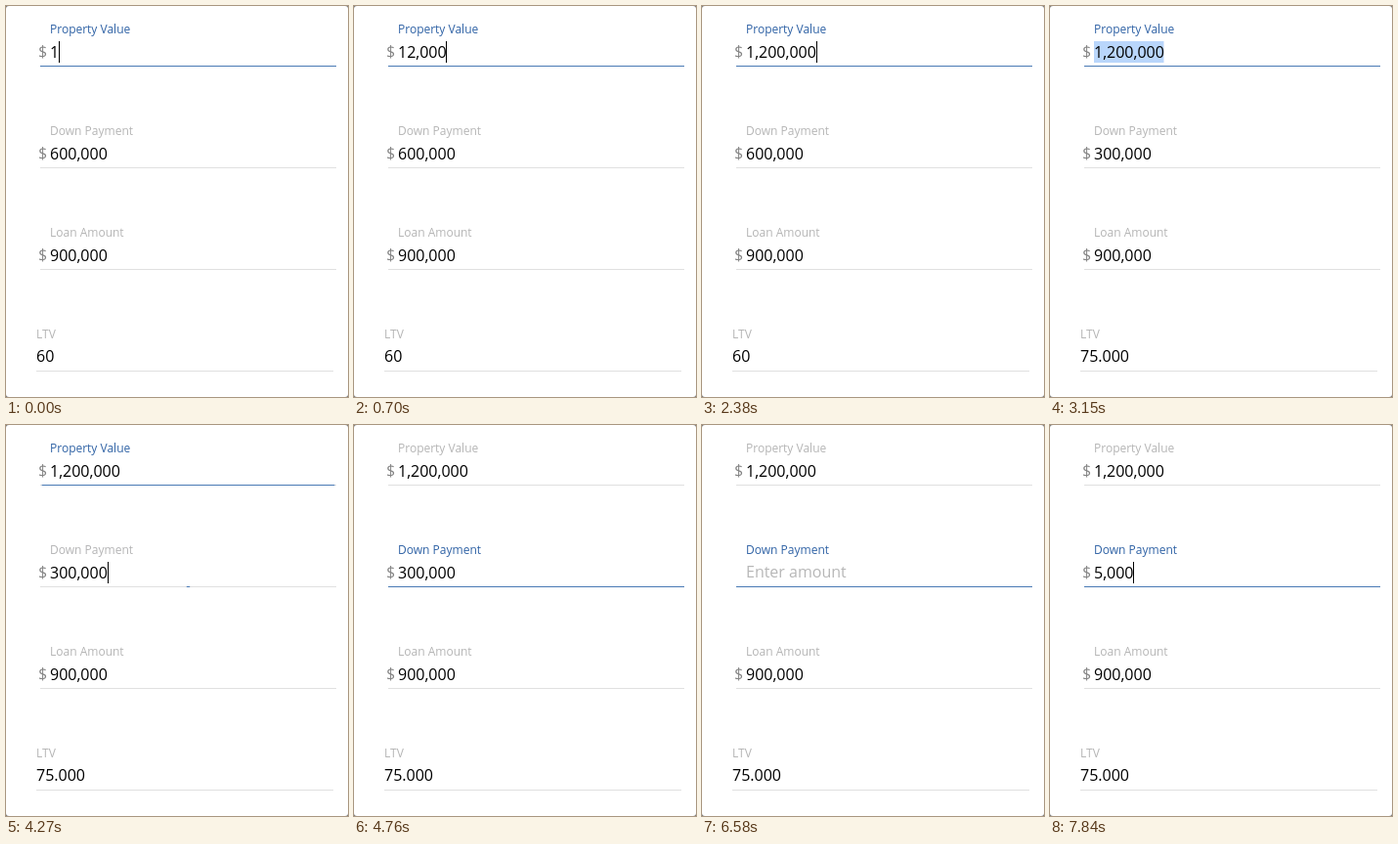
These frames come from a looping animation (350 by 400 pixels, 8000 ms). An HTML page:

```html
<!DOCTYPE html>
<html lang="en">
<head>
<meta charset="utf-8">
<title>Loan form</title>
<style>
  html, body { margin: 0; width: 100%; height: 100%; overflow: hidden; background: #777; }
  svg { display: block; width: 350px; height: 400px; background: #fff; border-radius: 3px; }
  text { font-family: "Open Sans", sans-serif; font-size: 16px; white-space: pre; }
  .label { font-size: 12px; fill: #b5b5b5; }
  .sign { fill: #858585; }
  .hint { fill: #b7b7b7; }
  .line { fill: #e0e0e0; }
  .focus { fill: #4a7ab5; }
</style>
</head>
<body>
<svg id="stage" viewBox="0 0 350 400"></svg>
<script>
const LOOP = 8000, FADE = 450, SWITCH = 4270, CLEARED = 6090, RETYPED = 7280;
const GRAY = [181, 181, 181], BLUE = [47, 98, 165];
const stage = document.getElementById('stage');

function add(tag, attrs, text = '') {
  const el = document.createElementNS('http://www.w3.org/2000/svg', tag);
  for (const key in attrs) el.setAttribute(key, attrs[key]);
  el.textContent = text;
  stage.append(el);
  return el;
}

const selection = add('rect', { x: 45, y: 36, width: 71.5, height: 22, fill: '#b9d6fb' });

function field(name, y, x = 45, left = 35, right = 338, drop = 53) {
  const label = add('text', { class: 'label', x, y: y + 28 }, name);
  add('rect', { class: 'line', x: left, y: y + 61, width: right - left, height: 1 });
  const focus = add('rect', { class: 'focus', y: y + 61, width: 0, height: 1 });
  const sign = x === 45 ? add('text', { class: 'sign', x: 33, y: y + 52 }, '$') : null;
  return { label, focus, sign, value: add('text', { x, y: y + drop }) };
}

const property = field('Property Value', 0);
const down = field('Down Payment', 104);
const loan = field('Loan Amount', 208);
const ltv = field('LTV', 312, 31, 31, 335, 52);
const hint = add('text', { class: 'hint', x: 45, y: 156 }, 'Enter amount');
const caret = add('rect', { width: 1, height: 22, fill: '#000' });

// Each step: start time, new content
const propertySteps = [[0, '1'], [70, '12'], [280, '120'], [490, '1,200'],
  [700, '12,000'], [910, '120,000'], [1330, '1,200,000']];
const downSteps = [[0, '600,000'], [2940, '300,000'], [4900, '30,000'], [5040, '3,000'],
  [5250, '300'], [5460, '30'], [5600, '3'], [CLEARED, ''],
  [RETYPED, '5'], [7490, '50'], [7630, '500'], [7840, '5,000']];
const ltvSteps = [[0, '60'], [2940, '75.000']];
const caretSteps = [[0, true], [1890, false], [2380, true], [2870, false], [SWITCH, true],
  [4760, false], [4900, true], [6580, false], [7140, true]];

const at = (steps, t) => steps.findLast(step => step[0] <= t)[1];

function eased(t, start) {
  const p = Math.min(1, Math.max(0, (t - start) / FADE));
  return 1 - (1 - p) ** 5;
}

function setText(el, text) {
  if (el.textContent !== text) el.textContent = text;
}

function setFocus(f, amount) {
  const mix = GRAY.map((g, i) => Math.round(g + (BLUE[i] - g) * amount));
  f.label.style.fill = `rgb(${mix})`;
  f.focus.setAttribute('x', 186.5 - 151.5 * amount);
  f.focus.setAttribute('width', 303 * amount);
}

function textWidth(s) {
  return [...s].reduce((w, c) => w + (c === ',' ? 3.92 : 9.15), 0);
}

function draw(t) {
  const first = at(propertySteps, t), second = at(downSteps, t);
  setText(property.value, first);
  setText(down.value, second);
  setText(loan.value, '900,000');
  setText(ltv.value, at(ltvSteps, t));

  const moved = eased(t, SWITCH);
  setFocus(property, 1 - moved);
  setFocus(down, moved);

  down.sign.style.opacity = second ? 1 : 0;
  hint.style.opacity = eased(t, CLEARED) - eased(t, RETYPED);
  selection.style.opacity = t >= 2940 && t < SWITCH ? 1 : 0;

  const inFirst = t < SWITCH;
  caret.style.opacity = at(caretSteps, t) ? 1 : 0;
  caret.setAttribute('x', Math.round(45 + textWidth(inFirst ? first : second) - 0.3));
  caret.setAttribute('y', inFirst ? 36 : 140);
}

function frame() {
  draw(performance.now() % LOOP);
  requestAnimationFrame(frame);
}
frame();
</script>
</body>
</html>
```
